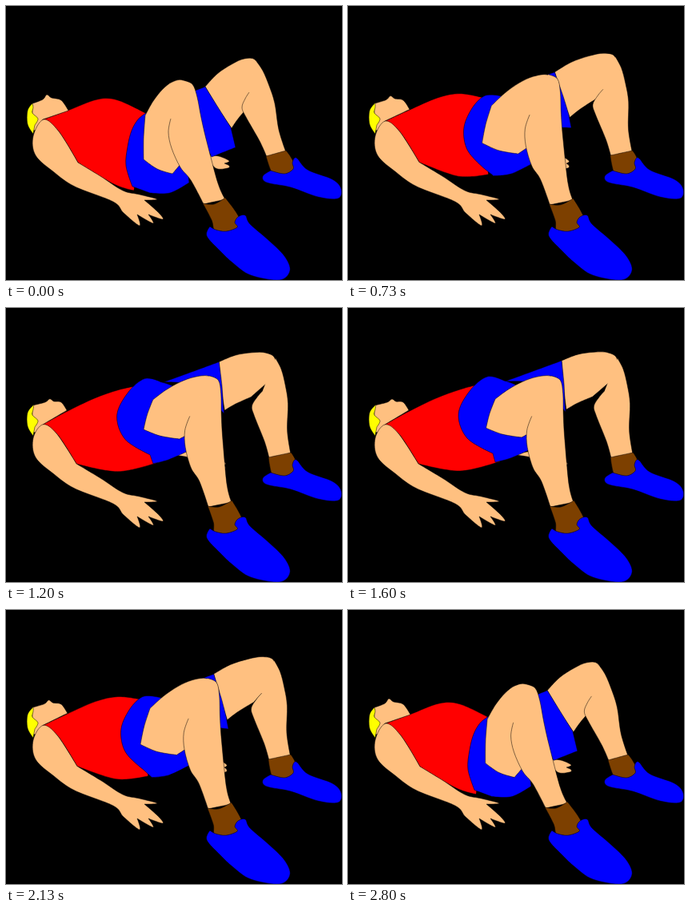
These frames come from a looping animation (420 px wide and 343 px high, 2.87 s). An HTML page:

```html
<!DOCTYPE html>
<html lang="en">
<head>
<meta charset="utf-8">
<title>Bridge exercise</title>
<style>
  html, body { margin: 0; width: 100%; height: 100%; overflow: hidden; background: #000; }
  svg { display: block; width: 100%; height: 100%; }
  path { stroke: #000; stroke-width: .5; stroke-linejoin: round; }
  .skin { fill: #ffc080; }
  .red { fill: #f00; }
  .blue { fill: #00f; }
  .brown { fill: #7d4000; }
  .yellow { fill: #ff0; }
</style>
</head>
<body>
<svg id="stage" viewBox="0 0 420 343"></svg>
<script>
const LOOP = 2870, FRAMES = 43;

// Outline points are "x y", or "lying > raised" where they move; "!" marks a corner.
const parse = text => text.split(',').map(item => {
  const [from, to = from] = item.replace('!', '').split('>')
    .map(p => p.trim().split(' ').map(Number));
  return { from, to, corner: item.includes('!') };
});

// Joints of the legs; knees and ankles run ahead of the hips.
const joint = (text, leads = false) => ({ ...parse(text)[0], leads });
const near = {
  hemTop: joint('174 137 > 184 114'),
  hemLow: joint('208 210 > 217 162'),
  knee: joint('225 93 > 258 85', true),
  ankleL: joint('247 248 > 253 249', true),
  ankleR: joint('274 242 > 282 243', true),
  foot: joint('275 282')
};
const far = {
  hemTop: joint('249 101 > 267 66'),
  hemLow: joint('282 153 > 273 127'),
  knee: joint('310 67 > 335 62', true),
  ankleL: joint('326 189 > 329 188', true),
  ankleR: joint('350 183 > 356 183', true),
  foot: joint('340 212')
};
const thigh = leg => [leg.hemTop, leg.hemLow, leg.knee];
const shin = leg => [leg.ankleR, leg.ankleL, leg.knee];
const sock = leg => [leg.ankleR, leg.ankleL, leg.foot];

const stage = document.getElementById('stage');
const parts = [];

// Pinned parts follow three joints; an open part leaves its last side unstroked.
function add(kind, outline, pins, open = false) {
  const el = document.createElementNS('http://www.w3.org/2000/svg', 'path');
  el.setAttribute('class', kind);
  stage.append(el);
  const pts = parse(outline);
  if (open) pts[0].corner = pts[pts.length - 1].corner = true;
  if (pins) for (const p of pts) p.weights = weights(p.from, pins.map(j => j.from));
  parts.push({ el, pts, pins, open });
}

function weights([x, y], [o, p, q]) {
  const [ax, ay, bx, by] = [p[0] - o[0], p[1] - o[1], q[0] - o[0], q[1] - o[1]];
  const det = ax * by - bx * ay, dx = x - o[0], dy = y - o[1];
  return [(dx * by - bx * dy) / det, (ax * dy - dx * ay) / det];
}

// far arm
add('skin', '205 183!, 230 179!, 230 187!');
add('skin', '250 187!, 266 188, 279 194 > 274 194, 273 197!, 279 200 > 274 200, 277 203 > 272 203, 262 203');

// far leg
add('skin', '249 101!, 264 85, 282 73, 298 66, 312 68, 320 90!, 305 124!, 291 140, 282 153!, 267 131', thigh(far));
add('skin', '304 108, 299 116, 295 127, 300 139, 317 169, 326 189!, 350 183!, 341 155, 336 122, 329 100, 321 81, 312 68', shin(far), true);
add('brown', '325 188!, 350 181!, 356 189, 361 202, 348 212, 334 211', sock(far));
add('blue', '331 206!, 321 213, 326 221, 356 227, 390 239, 415 241, 419 229, 408 217, 377 205, 363 190, 358 196, 359 204, 348 210');

// shorts behind, shirt, shorts in front
add('blue', '234 107 > 196 92!, 249 101 > 267 66!, 267 130 > 270 95, 281 152 > 271 120!, 287 177 > 272 130!, 257 189 > 262 118!, 240 150 > 240 95');
add('red', '47 142 > 46 146!, 77 131 > 75 130, 114 117 > 110 113, 140 118 > 140 102, 176 135 > 162 96!, 160 231 > 190 192!, 135 223 > 140 204, 90 196 > 88 195!, 66 157 > 64 158');
add('blue', '175 134 > 195 91!, 165 142 > 174 86, 157 156 > 152 104, 152 176 > 138 133, 150 200 > 149 163, 158 226 > 181 182!, 180 234 > 184 193!, 205 234 > 203 188, 229 221 > 228 177!, 220 170 > 229 150, 200 140 > 220 105');

// near leg
add('skin', '174 137!, 184 119, 196 104, 208 95, 221 93, 230 105!, 225 190!, 208 210!, 189 204, 172 192!, 172 165', thigh(near));
add('skin', '206 141, 203 158, 207 178, 218 202, 231 218, 247 248!, 274 242!, 265 222, 251 170, 244 140, 239 114, 233 98, 221 93', shin(near), true);
add('brown', '246 247!, 260 248, 274 240!, 291 264, 289 278, 275 283, 261 281, 257 268', sock(near));
add('blue', '255 276!, 251 288, 268 307, 284 322, 306 337, 342 343, 355 331, 348 313, 328 293, 305 273, 299 262, 290 264, 286 271, 289 277, 275 282, 262 280');

// head
add('skin', '33 122!, 46 117 > 49 118, 51 111 > 55 114, 57 115 > 60 117, 69 118, 78 131 > 76 128!, 46 142 > 46 146!, 36 156, 33 145');
add('yellow', '33 122 > 35 121!, 27 131, 27 148, 34 160!, 36 149!, 40 141, 33 134, 34 127');

// near arm and hand
add('skin', `90 196 > 88 195!, 66 157 > 63 157, 47 142 > 46 146, 34 163, 37 187, 60 208, 86 226, 134 245,
  147 259, 167 275, 164 261!, 184 272, 178 261!, 196 267, 190 258, 173 243!, 189 242, 167 236, 146 231, 118 213`);

const mix = (a, b, k) => a.map((v, i) => v + (b[i] - v) * k);

function place({ pts, pins }, hip, knee) {
  if (!pins) return pts.map(p => mix(p.from, p.to, hip));
  const [o, a, b] = pins.map(j => mix(j.from, j.to, j.leads ? knee : hip));
  return pts.map(({ weights: [u, v] }) =>
    o.map((c, i) => c + u * (a[i] - c) + v * (b[i] - c)));
}

// Smooth curve through the points, sharp at corners.
function curve(part, xy) {
  const n = xy.length, at = i => xy[(i + n) % n];
  const handle = (i, dir) => at(i).map((v, j) =>
    part.pts[i % n].corner ? v : v + dir * (at(i + 1)[j] - at(i - 1)[j]) / 6);
  let d = 'M' + xy[0];
  for (let i = 0; i < (part.open ? n - 1 : n); i++)
    d += `C${handle(i, 1)} ${handle(i + 1, -1)} ${at(i + 1)}`;
  return part.open ? d : d + 'Z';
}

let shown = -1;
function draw(now) {
  const frame = Math.floor(now % LOOP / LOOP * FRAMES);
  if (frame !== shown) {
    shown = frame;
    const lift = Math.max(0, Math.sin(Math.PI * frame / (FRAMES - 1)));
    const hip = Math.min(1, 1.04 * lift ** 1.8);
    const knee = 1 - (1 - hip) ** 3;
    for (const part of parts)
      part.el.setAttribute('d', curve(part, place(part, hip, knee)));
  }
  requestAnimationFrame(draw);
}
draw(0);
</script>
</body>
</html>
```
